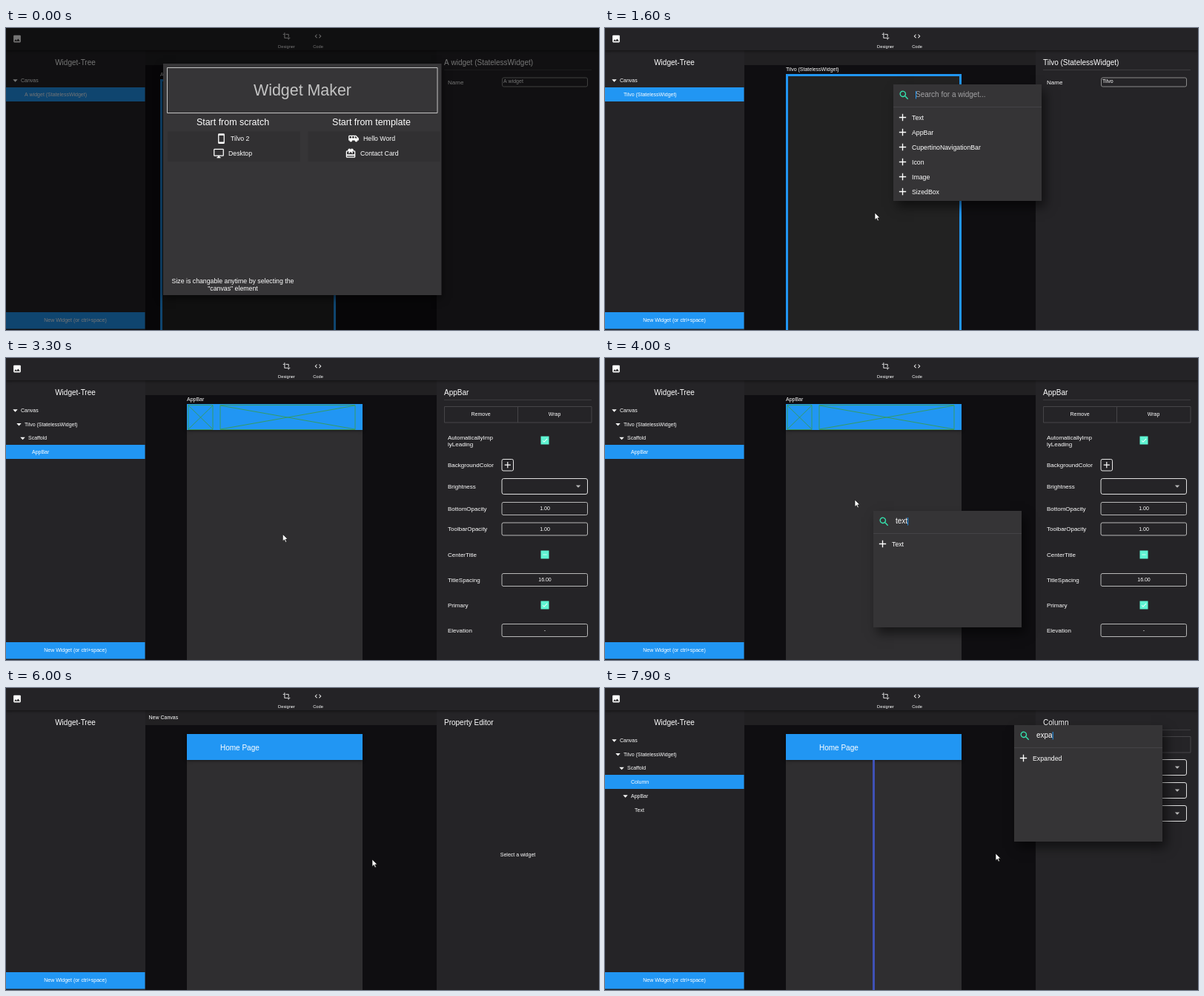
An HTML page with a canvas that plays this animation: 800 by 407 pixels, repeating every 8000 ms.

```html
<!DOCTYPE html>
<html lang="en">
<head>
<meta charset="utf-8">
<title>Widget Maker</title>
<style>
html, body { margin: 0; width: 100%; height: 100%; overflow: hidden; background: #0f0e11; }
canvas { display: block; }
</style>
</head>
<body>
<canvas id="stage" width="800" height="407"></canvas>
<script>
const ctx = document.getElementById('stage').getContext('2d');
const LOOP = 8000;
const BLUE = '#2196f3', TEAL = '#5ff5d3', GREEN = '#4caf50';
const PANEL = '#252427', SCAFFOLD = '#2f2e30', POPUP = '#353436';

// Icons on a 24-unit grid, filled even-odd.
const ICONS = {
  crop: 'M17 15h2V7c0-1-1-2-2-2H9v2h8zM7 17V1H5v4H1v2h4v10c0 1 1 2 2 2h10v4h2v-4h4v-2z',
  code: 'M9.4 16.6L4.8 12l4.6-4.6L8 6l-6 6 6 6zM14.6 16.6l4.6-4.6-4.6-4.6L16 6l6 6-6 6z',
  image: 'M3 5a2 2 0 0 1 2-2h14a2 2 0 0 1 2 2v14a2 2 0 0 1-2 2H5a2 2 0 0 1-2-2zM8.5 13.5l2.5 3 3.5-4.5 4.5 6H5z',
  search: 'M15.5 14l-1-.3A6.5 6.5 0 1 0 13.7 14.5l.3 1 5 5 1.5-1.5zM9.5 14a4.5 4.5 0 1 1 .01 0z',
  add: 'M19 13h-6v6h-2v-6H5v-2h6V5h2v6h6z',
  check: 'M9 16.2L4.8 12l-1.4 1.4L9 19 21 7l-1.4-1.4z',
  minus: 'M5 11h14v2H5z',
  phone: 'M5 3a2 2 0 0 1 2-2h10a2 2 0 0 1 2 2v18a2 2 0 0 1-2 2H7a2 2 0 0 1-2-2zM7 5v14h10V5z',
  desktop: 'M1 4a2 2 0 0 1 2-2h18a2 2 0 0 1 2 2v12a2 2 0 0 1-2 2h-7v2h2v2H8v-2h2v-2H3a2 2 0 0 1-2-2zM3 4v12h18V4z',
  bus: 'M17 5H3a2 2 0 0 0-2 2v9h2a3 3 0 0 0 6 0h5.5a3 3 0 0 0 6 0H23v-5zM3 7v4h4V7zM9 7v4h4V7zM15 7v4h5l-4-4z',
  gift: 'M20 6h-2a3 3 0 0 0-6-2 3 3 0 0 0-6 2H4a2 2 0 0 0-2 2v11a2 2 0 0 0 2 2h16a2 2 0 0 0 2-2V8a2 2 0 0 0-2-2zM4 17h16v2H4zM4 8h5l-2 3 2 1 3-4 3 4 2-1-2-3h5v6H4z'
};
for (const name in ICONS) ICONS[name] = new Path2D(ICONS[name]);

const WIDGETS = ['Text', 'AppBar', 'CupertinoNavigationBar', 'Icon', 'Image',
  'SizedBox', 'Scaffold', 'Column', 'Expanded'];
const CURSOR = [[0, 345, 250], [300, 316, 152], [500, 316, 152], [1100, 364, 249], [2000, 364, 249],
  [2400, 380, 246], [3200, 380, 246], [3600, 337, 191], [4200, 337, 191], [4700, 701, 104],
  [5700, 701, 104], [6000, 494, 231], [7100, 494, 231], [7400, 527, 223]];
const STEPS = [0, 500, 2000, 3200, 4200, 6000, 7200];
const TITLES = ['A widget (StatelessWidget)', 'Tilvo (StatelessWidget)', 'Scaffold', 'AppBar',
  'Text', 'Property Editor', 'Column'];
const POPUPS = [
  { open: 1300, type: 1700, close: 2000, query: 'scaf' },
  { open: 2500, type: 2700, close: 3200, query: 'appb' },
  { open: 3600, type: 3700, close: 4200, query: 'text' },
  { open: 6300, type: 6500, close: 7200, query: 'colu' },
  { open: 7500, type: 7600, close: 8000, query: 'expa' }
];

const clamp01 = v => Math.max(0, Math.min(1, v));

function rect(x, y, w, h, color) {
  ctx.fillStyle = color;
  ctx.fillRect(x, y, w, h);
}
function frame(x, y, w, h, color = '#d0d0d0', radius = 0, width = 1) {
  ctx.strokeStyle = color;
  ctx.lineWidth = width;
  ctx.beginPath();
  ctx.roundRect(x, y, w, h, radius);
  ctx.stroke();
}
function line(x1, y1, x2, y2, color, width = 1) {
  ctx.strokeStyle = color;
  ctx.lineWidth = width;
  ctx.beginPath();
  ctx.moveTo(x1, y1);
  ctx.lineTo(x2, y2);
  ctx.stroke();
}
function cross(x1, y1, x2, y2, color, width) {
  line(x1, y1, x2, y2, color, width);
  line(x1, y2, x2, y1, color, width);
}
// y is the middle of the capitals
function text(str, x, y, size = 7, color = '#fff', align = 'left') {
  ctx.font = `${size}px "Liberation Sans", Arial, sans-serif`;
  ctx.textAlign = align;
  ctx.fillStyle = color;
  ctx.fillText(str, x, y + size * 0.35);
  return ctx.measureText(str).width;
}
function icon(name, cx, cy, size, color = '#fff') {
  ctx.save();
  ctx.translate(cx - size / 2, cy - size / 2);
  ctx.scale(size / 24, size / 24);
  ctx.fillStyle = color;
  ctx.fill(ICONS[name], 'evenodd');
  ctx.restore();
}
function arrowDown(cx, cy, color = '#fff') {
  ctx.fillStyle = color;
  ctx.beginPath();
  ctx.moveTo(cx - 3.2, cy - 1.6);
  ctx.lineTo(cx + 3.2, cy - 1.6);
  ctx.lineTo(cx, cy + 1.8);
  ctx.fill();
}
function withShadow(blur, dx, dy, draw) {
  ctx.save();
  ctx.shadowColor = 'rgba(0,0,0,.55)';
  ctx.shadowBlur = blur;
  ctx.shadowOffsetX = dx;
  ctx.shadowOffsetY = dy;
  draw();
  ctx.restore();
}

function cursorAt(t) {
  const i = CURSOR.findLastIndex(k => k[0] <= t);
  const [t0, x0, y0] = CURSOR[i], [t1, x1, y1] = CURSOR[i + 1] || [LOOP, x0, y0];
  const p = clamp01((t - t0) / (t1 - t0)), e = p * p * (3 - 2 * p);
  return [x0 + (x1 - x0) * e, y0 + (y1 - y0) * e];
}
function pageTitle(t) {
  return t < 5000 ? 'Hello' : 'Home Page'.slice(0, Math.floor((t - 4900) / 100));
}

function drawChrome() {
  rect(188, 30, 393, 377, '#0f0e11');
  rect(188, 30, 393, 20, '#212022');
}
function drawSides() {
  rect(0, 30, 188, 377, PANEL);
  rect(581, 30, 219, 377, PANEL);
  withShadow(4, 0, 1, () => rect(0, 0, 800, 30, '#242326'));
  icon('image', 15, 14.5, 13);
  icon('crop', 378.5, 11, 10.5);
  icon('code', 421, 11, 10.5);
  text('Designer', 378.5, 25, 5.7, '#fff', 'center');
  text('Code', 421, 25, 5.7, '#fff', 'center');
  text('Widget-Tree', 93.5, 46, 10, '#fff', 'center');
  rect(0, 383, 187.5, 22.5, BLUE);
  text('New Widget (or ctrl+space)', 93.5, 394, 7, '#fff', 'center');
}

function drawTree(step) {
  if (step === 5) return;
  const root = TITLES[Math.min(step, 1)];
  let rows = [['Canvas', 0], [root, 1], ['Scaffold', 2], ['AppBar', 3], ['Text', 4]];
  let selected = Math.max(step, 1);
  if (step === 6) {
    rows.splice(3, 0, ['Column', 3]);
    selected = 3;
  } else rows = rows.slice(0, selected + 1);
  rows.forEach(([name, depth], i) => {
    const x = 20 + depth * 5, y = 70.4 + i * 18.75;
    if (i === selected) rect(0, Math.round(y - 9.4), 187.5, 19, BLUE);
    if (rows[i + 1] && rows[i + 1][1] > depth) arrowDown(x - 7.5, y + 0.5);
    text(name, x, y);
  });
}

function drawPage(step, t) {
  const x = step ? 244 : 208, y = step ? 62 : 69;
  if (step < 2) {
    rect(x, y, 237, 437, '#222');
    frame(x + 1.5, y + 1.5, 234, 434, BLUE, 0, 3);
  } else rect(x, y, 237, 437, SCAFFOLD);
  if (step < 4) text(TITLES[step], x, y - 6);

  if (step === 2) {
    cross(245, 63, 480, 97, GREEN, 1.3);
    line(245, 97, 480, 97, GREEN, 1.5);
    cross(245, 97, 480, 499, GREEN, 1.3);
    frame(x + 1.5, y + 1.5, 234, 434, BLUE, 0, 3);
  }
  if (step > 2) {
    withShadow(4, 0, 1, () => rect(x, y, 237, 35, BLUE));
    if (step === 3) {
      for (const [a, b] of [[246, 279], [289, 471]]) {
        cross(a, 64, b, 96, '#359c66');
        frame(a, 63.5, b - a, 33, '#359c66');
      }
    } else {
      if (step === 4) text('Text', 289, 70.5, 10);
      text(pageTitle(t), 289, 80, 10);
    }
  }
  if (step === 6) rect(361, 97, 3, 310, '#3f51b5');
}

const label = (str, y) => text(str, 596, y, 8);
function field(name, y, value, h = 17) {
  label(name, y);
  frame(669, y - h / 2, 115.5, h, '#b8b8b8', 2);
  text(value, 727, y, 7, '#fff', 'center');
}
function textInput(name, y, value, caret) {
  label(name, y);
  frame(669.5, y - 6, 115, 12, '#8a8a8a', 2);
  const w = text(value, 671, y - 1);
  if (caret) rect(671.5 + w, y - 5, 1, 9, BLUE);
}
function select(name, y, value, h = 21) {
  label(name, y);
  frame(669, y - h / 2, 115.5, h, '#e0e0e0', 2.5);
  text(value, 674, y, 8);
  arrowDown(772, y, '#bbb');
}
function checkbox(name, y, mark) {
  label(name, y);
  rect(721.5, y - 5.5, 11, 11, TEAL);
  icon(mark, 727, y, 9, '#fff');
}
function colorButton(y) {
  label('BackgroundColor', y);
  frame(669, y - 7.5, 15.5, 15.5, '#e8e8e8', 2);
  icon('add', 676.8, y + 0.2, 14);
}

function drawProperties(step, t) {
  text(TITLES[step], 591, 46, 10);
  if (step === 5) {
    text('Select a widget', 690.5, 225, 7, '#fff', 'center');
    return;
  }
  line(591, 56.5, 790, 56.5, '#3c3b3e');
  if (step < 2) {
    textInput('Name', 73, TITLES[step].split(' (')[0]);
    return;
  }
  frame(591.5, 65.5, 198.5, 21.5, '#464548');
  line(690.5, 65.5, 690.5, 87, '#464548');
  text('Remove', 640.5, 76, 7, '#fff', 'center');
  text('Wrap', 740, 76, 7, '#fff', 'center');
  if (step === 2) colorButton(104);
  if (step === 3) {
    label('AutomaticallyImp', 107);
    label('lyLeading', 116);
    checkbox('', 111, 'check');
    colorButton(144);
    select('Brightness', 173, '');
    field('BottomOpacity', 203, '1.00');
    field('ToolbarOpacity', 230.5, '1.00');
    checkbox('CenterTitle', 265, 'minus');
    field('TitleSpacing', 299, '16.00');
    checkbox('Primary', 333, 'check');
    field('Elevation', 367, '-');
  }
  if (step === 4) {
    textInput('Text', 103, pageTitle(t), t >= 4900);
    select('Overflow', 130, 'clip');
    select('TextAlign', 161, 'start');
    field('Style', 190, '', 16);
    icon('add', 727, 190, 14);
  }
  if (step === 6) {
    select('MainAxisAlign', 107, 'start');
    select('MainAxisSize', 138, 'max');
    select('CrossAxisAlign', 169, 'center');
  }
}

function drawPopup({ open, type, query }, t) {
  const [cx, cy] = cursorAt(open);
  const x = Math.round(cx + 24.6), y = Math.round(cy + 15 + 157 < 364 ? cy + 15 : cy - 173);
  const typed = query.slice(0, Math.max(0, Math.floor((t - type) / 100) + 1));
  withShadow(14, 5, 8, () => rect(x, y, 200, 157, POPUP));
  icon('search', x + 14.5, y + 14.5, 16, '#35e6b0');
  const w = text(typed, x + 30, y + 13.5, 10);
  if (!typed) text('Search for a widget...', x + 30, y + 13.5, 10, '#a2a2a4');
  rect(x + 30 + w, y + 9, 1, 10.5, BLUE);
  line(x, y + 30.5, x + 200, y + 30.5, '#444346');
  WIDGETS.filter(n => n.toLowerCase().startsWith(typed)).slice(0, 6).forEach((name, i) => {
    const row = y + 45 + i * 20;
    icon('add', x + 12.5, row - 0.5, 16);
    text(name, x + 25, row, 8.75);
  });
}

function drawDialog() {
  withShadow(10, 0, 4, () => rect(212, 48, 375.5, 312, '#363537'));
  frame(217.5, 53.5, 364.5, 61, '#c4c4c4');
  text('Widget Maker', 400, 84, 21.4, '#c4c4c4', 'center');
  text('Start from scratch', 306, 127, 12.45, '#fff', 'center');
  text('Start from template', 493, 127, 12.45, '#fff', 'center');
  rect(218, 139.5, 179, 40.5, '#313032');
  rect(407.5, 139.5, 178, 40.5, '#313032');
  const options = [['phone', 290.5, 303, 149, 'Tilvo 2'], ['desktop', 287, 300, 169, 'Desktop'],
    ['bus', 469, 482, 149, 'Hello Word'], ['gift', 465, 478, 169, 'Contact Card']];
  for (const [name, iconX, x, y, str] of options) {
    icon(name, iconX, y, 15);
    text(str, x, y, 8.75);
  }
  text('Size is changable anytime by selecting the', 306, 341, 8.75, '#fff', 'center');
  text('"canvas" element', 306, 351, 8.75, '#fff', 'center');
}

function drawCursor(x, y) {
  ctx.save();
  ctx.translate(x, y);
  ctx.fillStyle = '#fff';
  ctx.strokeStyle = '#111';
  ctx.lineWidth = 0.7;
  ctx.beginPath();
  for (const [px, py] of [[0, 0], [0, 9.5], [2.3, 7.5], [3.8, 11], [5.4, 10.3], [3.9, 6.9], [6.8, 6.7]])
    ctx.lineTo(px, py);
  ctx.closePath();
  ctx.fill();
  ctx.stroke();
  ctx.restore();
}

function draw(t) {
  const step = STEPS.findLastIndex(s => s <= t);
  drawChrome();
  if (step === 5) text('New Canvas', 192.5, 40);
  drawPage(step, t);
  drawSides();
  drawTree(step);
  drawProperties(step, t);
  const popup = POPUPS.find(p => p.open <= t && t < p.close);
  if (popup) drawPopup(popup, t);
  const modal = clamp01((700 - t) / 200);
  if (modal) {
    ctx.globalAlpha = modal;
    rect(0, 0, 800, 407, 'rgba(0,0,0,.54)');
    drawDialog();
    ctx.globalAlpha = 1;
  }
  if (t >= 100) drawCursor(...cursorAt(t));
}

const start = performance.now();
function tick() {
  const t = (performance.now() - start) % LOOP;
  draw(Math.floor(t / 100) * 100);
  requestAnimationFrame(tick);
}
tick();
</script>
</body>
</html>
```
